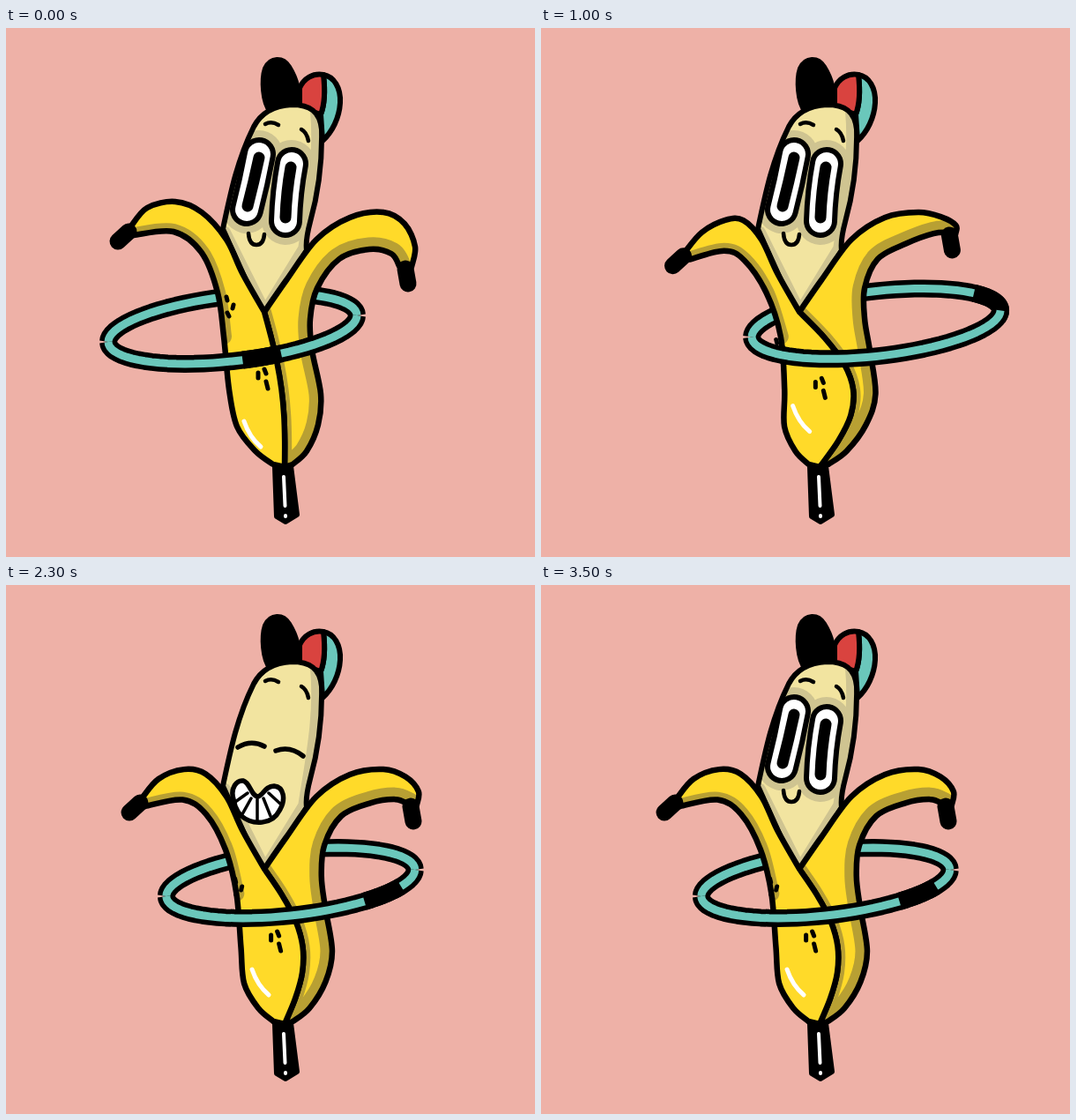
Write an HTML page that moves like this. It is 600 by 600 pixels and loops after 3.6 s.

```html
<!DOCTYPE html>
<html lang="en">
<head>
<meta charset="utf-8">
<title>Hula banana</title>
<style>
html, body { margin: 0; width: 100%; height: 100%; overflow: hidden; background: #eeb1a7; }
svg { display: block; width: 600px; height: 600px; stroke-linecap: round; stroke-linejoin: round; }
</style>
</head>
<body>
<svg id="stage" viewBox="0 0 600 600"></svg>
<script>
const YELLOW = '#ffda29', GOLD = '#b8a033', CREAM = '#f2e4a0', DIM = '#cfc491',
      TEAL = '#6ac7bb', RED = '#d9433f';
const { PI, sin, cos, hypot, max, min, abs, sign } = Math;
const clamp = v => max(0, min(1, v));
const points = text => text.split(' ').map(p => p.split(',').map(Number));

// Peel edges at rest; the seam and every other pose follow from rules.
const edges = {
  leftTop: points('141,226 160,204 192,197 222,209 250,240 268,278 293,322'),
  leftSide: points('303,495 283,480 262,452 253,410 247,350 240,300 222,255 190,231 145,235'),
  rightTop: points('293,322 318,286 352,240 390,215 428,209 452,222 464,248 460,271'),
  rightSide: points('446,270 437,256 412,251 378,262 353,295 345,330 347,365 357,415 354,450 341,480 325,495')
};

// SVG helpers
const line = (d, w, color = '#000', more = '') =>
  `<path d="${d}" fill="none" stroke="${color}" stroke-width="${w}" ${more}/>`;
const flat = (d, color) => `<path d="${d}" fill="${color}"/>`;
const fill = (d, color, w = 6) => flat(d, color) + line(d, w);
const clipped = (id, d, content) =>
  `<clipPath id="${id}"><path d="${d}"/></clipPath><g clip-path="url(#${id})">${content}</g>`;

// Smooth curve through the points, without the leading M.
function spline(pts) {
  const at = i => pts[max(0, min(pts.length - 1, i))];
  const handle = (i, k) => at(i).map((v, n) => v + k * (at(i + 1)[n] - at(i - 1)[n]) / 6);
  return pts[0] + pts.slice(1).map((p, i) => `C${handle(i, 1)} ${handle(i + 1, -1)} ${p}`).join('');
}

// Hips push sideways most at the middle of the body.
const hip = ([x, y], b) => [x + 15 * b * sin(PI * clamp((y - 250) / 247)), y];

// A swing to the right pulls the left arm down and the right arm up.
function arm([x, y], b) {
  const pull = max(0, b);
  const l = pull * clamp((245 - x) / 70);
  const r = pull * clamp((x - 400) / 50) * clamp((y - 210) / 60);
  return [x + 13 * l + 6 * r, y + 16 * l - 22 * r];
}

const seamAt = (t, b) => [293 + 23 * t + (8 + 24 * b) * sin(PI * t), 322 + 176 * t];

function peels(b) {
  const bend = name => edges[name].map(p => arm(name.endsWith('Side') ? hip(p, b) : p, b));
  const seam = [0, 1, 2, 3, 4, 5, 6].map(n => seamAt(n / 6, b));
  const leftSide = bend('leftSide'), rightSide = bend('rightSide');
  const left = `M${spline(bend('leftTop'))}L${spline(seam)}L${spline(leftSide)}Z`;
  const right = `M${spline(rightSide)}L${spline(seam.reverse())}L${spline(bend('rightTop'))}Z`;
  const tip = (a, z, w) => line(`M${arm(a, b)}L${arm(z, b)}`, w);
  return flat(right, YELLOW) +
    clipped('right', right, line('M' + spline(rightSide), 27, GOLD) + line('M' + spline(seam), 16, GOLD)) +
    line(right, 6.5) + flat(left, YELLOW) +
    clipped('left', left, line('M' + spline(leftSide.slice(4)), 18, GOLD)) + line(left, 6.5) +
    tip([139, 231], [127, 242], 19) + tip([453, 273], [456, 290], 19);
}

function marks(b) {
  const put = (x, y, drop, d, color) => {
    const [px, py] = hip([x, y], b);
    return line(`M${px} ${py + drop * max(0, b)}${d}`, 5, color);
  };
  return put(250, 305, 28, 'l1 4m7 5l-1 4m-6 5l2 4') +
    put(286, 391, 6, 'v6m7 -10l2 5m0 9l2 8') +
    put(270, 446, -10, 'q6 18 19 29', '#fff');
}

// Hoop: a sheared ellipse, its near and far halves drawn apart.
function hoopArc(shift, from, to) {
  const dots = [];
  for (let n = 0; n <= 40; n++) {
    const a = from + (to - from) * n / 40;
    dots.push([257 + shift + 141 * cos(a), 341 - 15 * cos(a) + 37 * sin(a) - max(0, shift) / 22]);
  }
  return 'M' + dots.join('L');
}

function hoopHalf(shift, grip, near) {
  const d = near ? hoopArc(shift, 0, PI) : hoopArc(shift, PI, 2 * PI);
  const half = 22 / hypot(141 * sin(grip), 40 * cos(grip));
  const held = sin(grip) > 0 === near ? line(hoopArc(shift, grip - half, grip + half), 20) : '';
  return `<g stroke-linecap="butt">${line(d, 20)}${line(d, 9, TEAL)}${held}</g>`;
}

// Face
const HEAD = 'M246 228C254 190 262 150 281 112C290 95 305 88 324 87C345 87 356 95 358 115C359 160 352 195 345 220C341 235 340 245 341 252L293 332Z';
const BROWS = line('M294 109Q301 105 309 110M335 115Q341 118 343 128', 4.5);
const SMILE = line('M275 233Q276 246 284 246Q292 246 293 234', 4.5);
const SHUT = line('M263 184Q278 175 293 183M306 188Q322 182 337 194', 5.5);
const SOCKETS = 'M287 143Q281 175 273 206M324 154Q318 186 317 219';
const EYES = line(SOCKETS, 38) + line(SOCKETS, 26, '#fff') +
  line('M287 147Q281 175 274 202M323 158Q318 186 317 215', 13);
const HALF = ['M262 160Q283 155 298 168', 'M304 170Q322 165 338 177'];
const LOW = ['M260 182L295 186', 'M302 189L337 188'];

const lidded = ([a, b]) =>
  clipped('lid', `${a}${b.replace('M', 'L')}H345V260H250V160Z`, EYES) + line(a + b, 6.5);

function grin(size) {
  return `<g transform="translate(285 246) scale(${size}) translate(-285 -246)">` +
    fill('M258 243C254 230 262 221 269 222C277 224 278 240 286 240C292 238 294 228 304 228C315 229 318 243 310 256C302 272 280 273 267 262C262 257 259 250 258 243Z', '#fff', size < 1 ? 8 : 5.5) +
    line('M260 246L274 236M268 260L278 242M285 268V243M300 262L292 242M312 249L298 236', 3.5) + '</g>';
}

// away: steps from the middle of the laugh, which decides lids and mouth.
function head(away) {
  const open = away > 8;
  const look = open ? EYES : away > 7 ? lidded(HALF) : away > 5 ? lidded(LOW) : SHUT;
  const mouth = away > 7 ? SMILE : grin(away > 4 ? .58 : 1);
  return fill('M360 53C372 55 380 68 379 85C378 102 370 118 359 128L357 98C362 85 362 70 360 53Z', TEAL) +
    fill('M333 68C338 57 348 51 360 53C362 70 362 85 357 98L333 90Z', RED) +
    fill('M300 95C291 84 290 58 294 46C300 33 314 33 321 44C329 57 333 72 331 86Z', '#000') +
    flat(HEAD, CREAM) +
    clipped('head', HEAD, (open ? line(SOCKETS, 54, DIM) : '') +
      line('M357 94C362 150 351 200 343 252L295 330', 24, DIM) + line('M248 232L291 318', 14, DIM)) +
    line(HEAD, 6) + BROWS + look + mouth;
}

const STEM = fill('M305 498L323 497L330 552L317 560L307 554Z', '#000') +
  line('M315 509L316.5 542M317 553V554', 4, '#fff');

function draw(step) {
  const a = PI * step / 6, swing = -sin(a), reach = abs(swing);
  const shift = swing > 0 ? 145 * reach ** 1.14 : -78 * reach ** .83;
  const grip = 1.33 + 2 * a - .31 * (sin(a) + sin(2 * a));
  return hoopHalf(shift, grip, false) + head(abs(step - 21.5)) + peels(2 * swing) +
    marks(2 * swing) + STEM + hoopHalf(shift, grip, true);
}

const stage = document.getElementById('stage');
let shown = -1;
function tick() {
  const step = Math.floor(performance.now() / 100) % 36;
  if (step !== shown) stage.innerHTML = draw(shown = step);
  requestAnimationFrame(tick);
}
tick();
</script>
</body>
</html>
```
